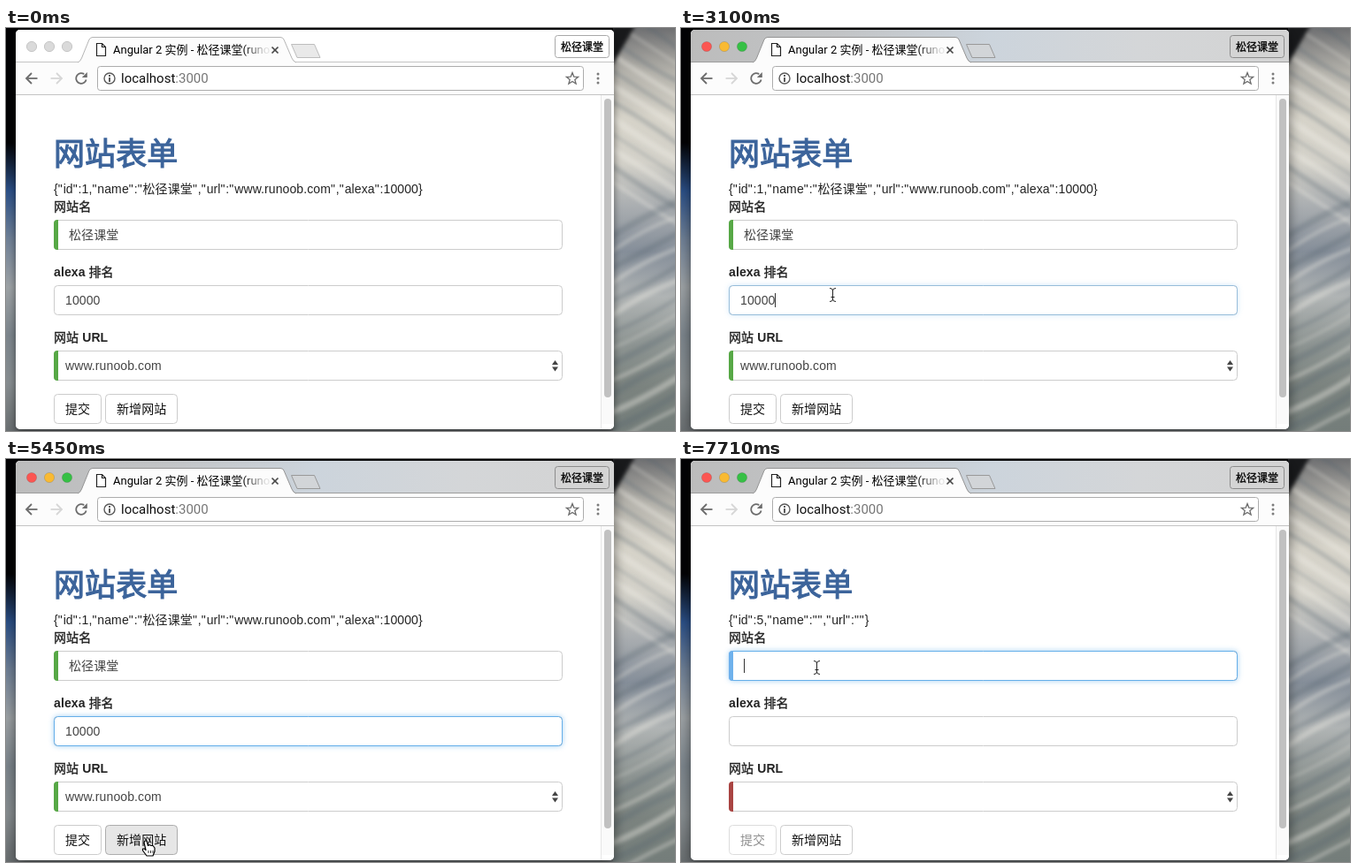
Recreate the animation shown at these times as an HTML page with a canvas. Size 756 px wide and 456 px high, loop 8000 ms.

```html
<!DOCTYPE html>
<html lang="zh-CN">
<head>
<meta charset="utf-8">
<title>网站表单</title>
<style>
html, body { margin: 0; width: 100%; height: 100%; overflow: hidden; background: #000; }
canvas { display: block; }
</style>
</head>
<body>
<canvas id="stage" width="756" height="456"></canvas>
<script>
const W = 756, H = 456, LOOP = 8000;
const ctx = document.getElementById('stage').getContext('2d');
const PAGE = '"Liberation Sans", "Noto Sans CJK SC", "Noto Sans CJK", sans-serif';
const UI = 'Roboto, "Noto Sans CJK SC", "Noto Sans CJK", sans-serif';
const SITE = '松径课堂';
const URL_TEXT = 'www.runoob.com';
const INK = '#222', ICON = '#6c6c6c';
const ACTIVE = 5, RESET = 44;

// pointer path: tick, x, y
const PATH = [
  [0, 419, 444], [1, 413, 404], [2, 409, 389], [6, 409, 389], [8, 322, 308],
  [10, 190, 203], [11, 173, 227], [14, 172, 227], [17, 175, 300], [19, 174, 339],
  [21, 171, 302], [23, 171, 302], [26, 160, 362], [28, 118, 408], [29, 92, 432],
  [31, 125, 435], [33, 155, 440], [34, 161, 440], [45, 161, 440], [48, 158, 312],
  [50, 151, 250], [52, 153, 238], [53, 153, 236]
];
const FOCUS = [
  { from: 11, to: 22, top: 217, caret: 127.5 },
  { from: 22, to: RESET, top: 291, caret: 106.5 },
  { from: 53, to: 99, top: 217, caret: 71.5 }
];

const tickAt = t => Math.floor((t - 486) / 118);
const inside = (x, y, l, t, r, b) => x >= l && x <= r && y >= t && y <= b;

// swell thickens glyphs by a hairline, for weights between regular and bold
function text(s, x, y, size, color, { family = PAGE, weight = 400, swell = 0 } = {}) {
  ctx.font = `${weight} ${size}px ${family}`;
  ctx.fillStyle = color;
  ctx.fillText(s, x, y);
  if (swell) {
    ctx.strokeStyle = color;
    ctx.lineWidth = swell;
    ctx.strokeText(s, x, y);
  }
  return x + ctx.measureText(s).width;
}

function box(x, y, w, h, r, fill, stroke) {
  ctx.beginPath();
  ctx.roundRect(x, y, w, h, r);
  if (fill) { ctx.fillStyle = fill; ctx.fill(); }
  if (stroke) { ctx.strokeStyle = stroke; ctx.lineWidth = 1; ctx.stroke(); }
}

function poly(points, fill, stroke, width = 1, closed = true) {
  ctx.beginPath();
  points.forEach(([x, y]) => ctx.lineTo(x, y));
  if (closed) ctx.closePath();
  if (fill) { ctx.fillStyle = fill; ctx.fill(); }
  if (stroke) { ctx.strokeStyle = stroke; ctx.lineWidth = width; ctx.stroke(); }
}

function disc(x, y, r, fill, stroke, width = 1) {
  ctx.beginPath();
  ctx.arc(x, y, r, 0, Math.PI * 2);
  if (fill) { ctx.fillStyle = fill; ctx.fill(); }
  if (stroke) { ctx.strokeStyle = stroke; ctx.lineWidth = width; ctx.stroke(); }
}

function gradient(x0, y0, x1, y1, ...colors) {
  const g = ctx.createLinearGradient(x0, y0, x1, y1);
  colors.forEach((c, i) => g.addColorStop(i / (colors.length - 1), c));
  return g;
}

function paintWallpaper() {
  ctx.fillStyle = '#020204';
  ctx.fillRect(0, 0, W, H);
  ctx.fillStyle = gradient(0, 130, 0, H, '#020204', '#2b4f86', '#6f8096', '#9da2a5', '#7c858c', '#878d90', '#696e70');
  ctx.fillRect(0, 130, 690, H - 130);
  ctx.fillStyle = gradient(0, 0, 0, H, '#6f7072', '#b5b3ac', '#d6d3c9', '#d3d1c9', '#a9adb0', '#858e99', '#b0b4b4', '#8f9694', '#7b837f', '#747d7a');
  ctx.fillRect(686, 0, W - 686, H);

  // soft cloud streaks: falling to the right above, rising below
  let seed = 11;
  const rnd = () => (seed = seed * 16807 % 2147483647) / 2147483647;
  ctx.save();
  ctx.beginPath();
  ctx.rect(686, 0, W - 686, H);
  ctx.clip();
  ctx.filter = 'blur(2px)';
  for (let i = 0; i < 26; i++) {
    const y = i * 18, slope = y < 200 ? 55 : -45, bend = rnd() * 16 - 8;
    ctx.strokeStyle = i % 2 ? 'rgba(240,238,230,.4)' : 'rgba(84,96,110,.28)';
    ctx.lineWidth = 2 + rnd() * 7;
    ctx.beginPath();
    ctx.moveTo(680, y - slope / 2);
    ctx.quadraticCurveTo(720, y + bend, 765, y + slope / 2);
    ctx.stroke();
  }
  poly([[684, -4], [712, -4], [684, 44]], '#18191b');
  ctx.restore();
}

function paintTabs(on) {
  box(11, 2, 676, 452, 5, '#fff');
  const bar = '#fcfcfc';
  ctx.save();
  ctx.beginPath();
  ctx.roundRect(11, 2, 676, 452, 5);
  ctx.clip();
  ctx.fillStyle = on ? gradient(11, 0, 687, 0, '#bcbcbc', '#c2c4c6', '#ccd4dc', '#d4d6d8', '#d3d3d3') : '#fff';
  ctx.fillRect(11, 2, 676, 37);
  ctx.fillStyle = bar;
  ctx.fillRect(11, 39, 676, 37);
  ctx.fillStyle = on ? '#9c9c9c' : '#c4c4c4';
  ctx.fillRect(11, 38, 676, 1);
  ctx.fillStyle = '#c3c3c3';
  ctx.fillRect(11, 75, 676, 1);
  ctx.restore();

  ['#fb5652', '#f9ba33', '#36c045'].forEach((c, i) =>
    disc(29 + i * 20, 21, 5.6, on ? c : '#dadada', on ? 'rgba(0,0,0,.12)' : '#c6c6c6'));

  ctx.beginPath();
  ctx.moveTo(81, 39);
  ctx.quadraticCurveTo(84, 38, 85.5, 34);
  ctx.lineTo(94, 13);
  ctx.quadraticCurveTo(95.5, 10.5, 98, 10.5);
  ctx.lineTo(310, 10.5);
  ctx.quadraticCurveTo(313, 10.5, 314, 13);
  ctx.lineTo(323, 34);
  ctx.quadraticCurveTo(324.5, 38, 328, 39);
  ctx.fillStyle = bar;
  ctx.fill();
  ctx.strokeStyle = on ? '#949494' : '#b5b5b5';
  ctx.lineWidth = 1;
  ctx.stroke();

  poly([[102.5, 17.5], [108.5, 17.5], [112.5, 21.5], [112.5, 31.5], [102.5, 31.5]], '#fff', '#222', 1.2);
  poly([[108.5, 17.5], [108.5, 21.5], [112.5, 21.5]], null, '#222', 1.2, false);
  text(`Angular 2 实例 - ${SITE}(runo`, 121, 29, 13,
    gradient(266, 0, 294, 0, '#000', 'rgba(0,0,0,.1)'), { family: UI });
  poly([[300.5, 21.5], [307.5, 28.5]], null, '#4a4a4a', 1.7, false);
  poly([[307.5, 21.5], [300.5, 28.5]], null, '#4a4a4a', 1.7, false);
  poly([[322.5, 18.5], [348.5, 18.5], [355, 33.5], [329, 33.5]], on ? '#d2d5d8' : '#e9e9e9', on ? '#999' : '#bdbdbd');

  box(620.5, 8.5, 61, 25, 3, on ? '#d4d4d4' : '#fff', on ? '#8c8c8c' : '#a8a8a8');
  text(SITE, 627, 25.5, 12, '#000', { family: UI, swell: .3 });
}

function arrowIcon(x, dir, color) {
  poly([[x - 6 * dir, 57], [x + 6.5 * dir, 57]], null, color, 1.8, false);
  poly([[x, 51], [x - 6 * dir, 57], [x, 63]], null, color, 1.8, false);
}

function paintToolbar() {
  arrowIcon(29, 1, ICON);
  arrowIcon(57, -1, '#d6d6d6');
  ctx.beginPath();
  ctx.arc(85, 57, 5.8, .25, 5.3);
  ctx.strokeStyle = ICON;
  ctx.lineWidth = 1.8;
  ctx.stroke();
  poly([[91.8, 50], [91.8, 56], [85.8, 56]], ICON);

  box(103.5, 43.5, 549, 27, 3, '#fff', '#acacac');
  disc(117, 57, 6, null, '#5a5a5a', 1.4);
  ctx.fillStyle = '#5a5a5a';
  ctx.fillRect(116, 53, 2, 2);
  ctx.fillRect(116, 56, 2, 5);
  const host = text('localhost', 130, 62, 15, '#111', { family: UI });
  text(':3000', host, 62, 15, '#777', { family: UI });

  const star = Array.from({ length: 10 }, (_, i) => {
    const a = i * Math.PI / 5 - Math.PI / 2, r = i % 2 ? 3 : 7;
    return [640 + r * Math.cos(a), 57.5 + r * Math.sin(a)];
  });
  poly(star, null, ICON, 1.3);
  [52, 57, 62].forEach(y => disc(669, y, 1.5, '#7c7c7c'));

  ctx.fillStyle = '#e6e6e6';
  ctx.fillRect(672, 76, 1, 378);
  ctx.fillStyle = '#fafafa';
  ctx.fillRect(673, 76, 14, 372);
  box(676, 80, 8, 338, 4, '#c1c1c1');
}

// the page font has wide straight quotes
function jsonLine(s, y) {
  let x = 54;
  for (const run of s.match(/"|[^"]+/g)) x = text(run, x, y, 14, INK) + (run === '"' ? .8 : 0);
}

function field(top, value, x, edge, glow) {
  ctx.save();
  if (glow) {
    ctx.shadowColor = `rgba(102,175,233,${.7 * glow})`;
    ctx.shadowBlur = 6;
  }
  box(54.5, top + .5, 574, 33, 4, '#fff');
  ctx.restore();
  box(54.5, top + .5, 574, 33, 4, '#fff', '#ccc');
  if (glow) {
    ctx.globalAlpha = glow;
    box(54.5, top + .5, 574, 33, 4, null, '#66afe9');
    ctx.globalAlpha = 1;
  }
  if (edge) box(54, top, 5, 34, [4, 0, 0, 4], edge);
  text(value, x, top + 22, 14, '#444');
}

function button(label, x, w, hover, disabled) {
  box(x + .5, 414.5, w - 1, 33, 4, hover ? '#e6e6e6' : '#fff', hover ? '#adadad' : disabled ? '#dcdcdc' : '#ccc');
  text(label, x + 13, 436, 14, disabled ? '#8e8e8e' : '#111');
}

function paintForm(n, mouse) {
  const empty = n >= RESET;
  const focus = FOCUS.find(f => n >= f.from && n < f.to);
  const glow = top => focus && focus.top === top ? Math.min(1, (n - focus.from + 2) / 4) : 0;
  const edge = empty ? '#a94442' : '#57a846';
  const over = (l, r) => mouse && inside(mouse.x, mouse.y, l, 414, r, 448);
  const medium = { swell: .35 }, bold = { weight: 700 };

  ctx.letterSpacing = '0.1px';
  text('网站表单', 54, 155, 35, '#3c649b', { swell: 1.2 });
  jsonLine(empty ? '{"id":5,"name":"","url":""}'
    : `{"id":1,"name":"${SITE}","url":"${URL_TEXT}","alexa":10000}`, 187);

  text('网站名', 54, 207, 14, INK, medium);
  text('排名', text('alexa ', 54, 281, 14, INK, bold), 281, 14, INK, medium);
  text(' URL', text('网站', 54, 355, 14, INK, medium), 355, 14, INK, bold);

  field(217, empty ? '' : SITE, 71, empty && focus ? '#6fb1ec' : edge, glow(217));
  field(291, empty ? '' : '10000', 67, null, glow(291));
  field(365, empty ? '' : URL_TEXT, 67, edge, 0);
  poly([[617, 381], [620.5, 376], [624, 381]], '#444');
  poly([[617, 383.5], [620.5, 388.5], [624, 383.5]], '#444');

  button('提交', 54, 54, !empty && over(54, 108), empty);
  button('新增网站', 112, 82, n < RESET && over(112, 194), false);
  ctx.letterSpacing = '0px';

  if (focus && Math.floor((n - focus.from) / 4) % 2 === 0) {
    const y = focus.top + 9;
    poly([[focus.caret, y], [focus.caret, y + 16]], null, '#333', 1, false);
  }
}

function pointerAt(n) {
  if (n < 0) return null;
  const i = PATH.findIndex(p => p[0] > n);
  if (i < 0) {
    const [, x, y] = PATH[PATH.length - 1];
    return { x, y };
  }
  const [t0, x0, y0] = PATH[i - 1], [t1, x1, y1] = PATH[i];
  const k = (n - t0) / (t1 - t0);
  return { x: Math.round(x0 + (x1 - x0) * k), y: Math.round(y0 + (y1 - y0) * k) };
}

function drawArrow() {
  poly([[0, 0], [0, 14], [3.3, 11], [5.8, 16.6], [8.2, 15.5], [5.8, 10.3], [10.3, 10.3]], '#000', '#fff', 1);
}

function drawBeam() {
  for (const [color, width] of [['#fff', 3], ['#222', 1]]) {
    ctx.beginPath();
    for (const s of [-1, 1]) {
      ctx.moveTo(-3, s * 7.5);
      ctx.quadraticCurveTo(.5, s * 7.5, .5, s * 5);
      ctx.quadraticCurveTo(.5, s * 7.5, 4, s * 7.5);
    }
    ctx.moveTo(.5, -6);
    ctx.lineTo(.5, 6);
    ctx.moveTo(-1.5, 2.5);
    ctx.lineTo(2.5, 2.5);
    ctx.strokeStyle = color;
    ctx.lineWidth = width;
    ctx.stroke();
  }
}

function drawHand() {
  ctx.lineJoin = 'round';
  poly([[-4, -8], [-2, -8], [-.5, -2.5], [1, -3.5], [3, -2.5], [5, -2.5], [7, 0],
    [7, 4], [5, 9], [-2, 9], [-6.5, 3], [-6.5, 1], [-4.5, 1], [-3, 2.5], [-5, -6]], '#fff', '#000', 1.2);
  [0, 2.5, 5].forEach(x => poly([[x, 3], [x, 6]], null, '#000', .8, false));
  ctx.lineJoin = 'miter';
}

function paintPointer({ x, y }) {
  ctx.save();
  ctx.translate(x, y);
  if (inside(x, y, 54, 414, 108, 448) || inside(x, y, 112, 414, 194, 448)) drawHand();
  else if (inside(x, y, 54, 217, 629, 251) || inside(x, y, 54, 291, 629, 325)) drawBeam();
  else drawArrow();
  ctx.restore();
}

function render(t) {
  const n = tickAt(t), mouse = pointerAt(n);
  ctx.drawImage(wallpaper, 0, 0);
  ctx.save();
  ctx.shadowColor = 'rgba(0,0,0,.5)';
  ctx.shadowBlur = n >= ACTIVE ? 14 : 8;
  ctx.shadowOffsetY = 4;
  box(11, 2, 676, 452, 5, '#fff');
  ctx.restore();
  paintTabs(n >= ACTIVE);
  paintToolbar();
  paintForm(n, mouse);
  if (mouse) paintPointer(mouse);
}

paintWallpaper();
const wallpaper = document.createElement('canvas');
wallpaper.width = W;
wallpaper.height = H;
wallpaper.getContext('2d').drawImage(ctx.canvas, 0, 0);

const start = performance.now();
function loop(now) {
  render(Math.max(0, now - start) % LOOP);
  requestAnimationFrame(loop);
}
render(0);
requestAnimationFrame(loop);
</script>
</body>
</html>
```
